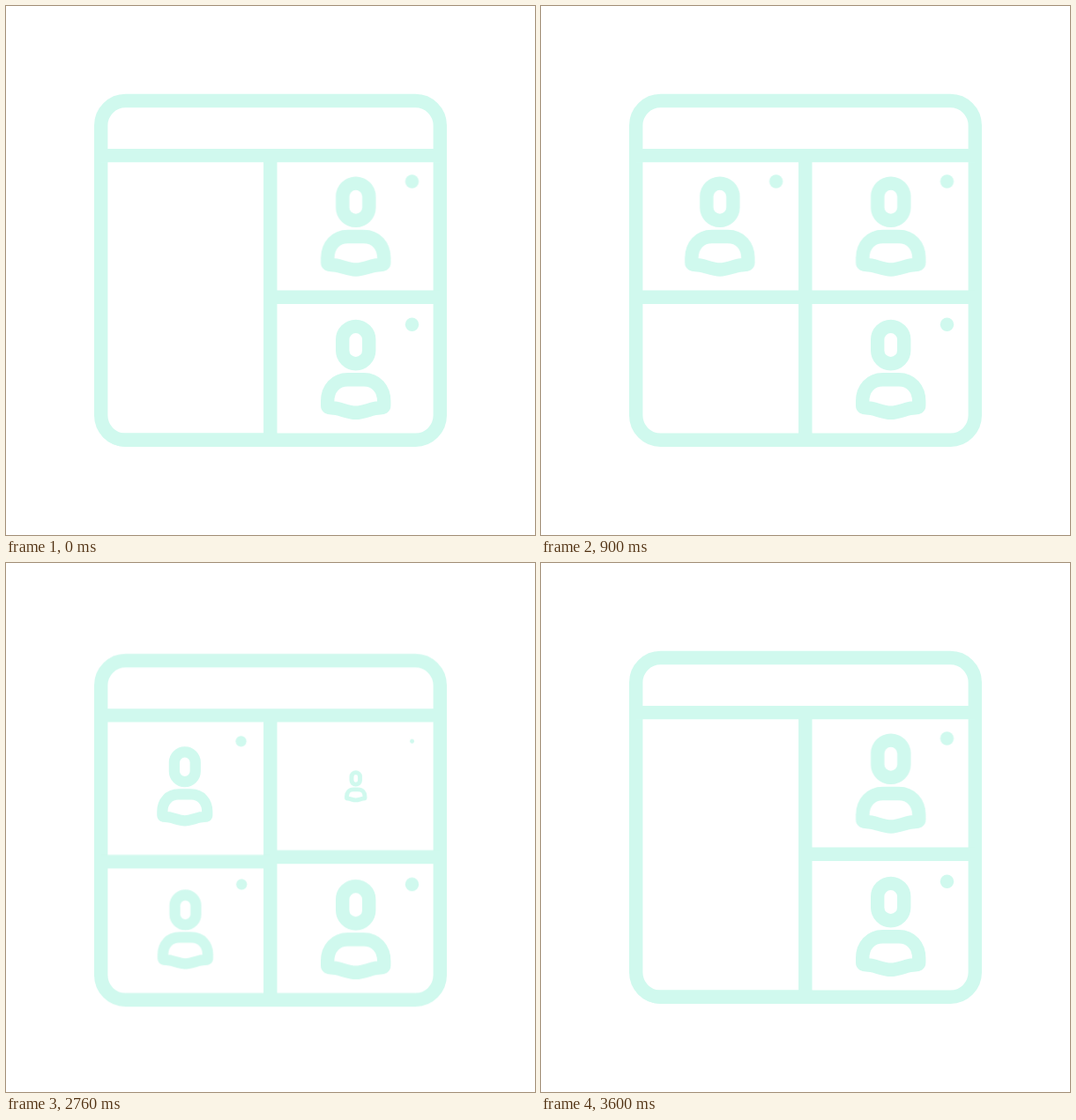
Write an HTML page without scripts that moves like this. It is 600 px wide and 600 px high and loops after 3.63 s.

```html
<!DOCTYPE html>
<html lang="en">
<head>
<meta charset="utf-8">
<title>Video call grid</title>
<style>
  html, body { margin: 0; width: 100%; height: 100%; overflow: hidden; background: #fff; }
  svg { display: block; width: 100%; height: 100%; }

  .line { fill: none; stroke: #d0f9ee; stroke-width: 15.4; stroke-linejoin: round; }
  .dot { fill: #d0f9ee; stroke: none; }

  .window, .divider, .drop, .tl, .tr, .bl { animation: 3.63s linear infinite; }
  .window { animation-name: dip; }
  .divider { animation-name: divide; }
  .drop { animation-name: lift; }
  .tl { animation-name: tl; }
  .tl.dot { animation-name: tl-dot; }
  .tr { animation-name: tr; }
  .bl { animation-name: bl; }

  /* The whole window sinks and recovers at each change of layout. */
  @keyframes dip {
    0% { transform: translateY(0); animation-timing-function: cubic-bezier(.4, 0, .6, 1); }
    8.264% { transform: translateY(17px); animation-timing-function: cubic-bezier(.167, 0, .08, 1); }
    24.8%, 47.107% { transform: translateY(0); animation-timing-function: cubic-bezier(.4, 0, .6, 1); }
    51.24% { transform: translateY(4px); animation-timing-function: cubic-bezier(.167, 0, .2, 1); }
    59.5%, 73.554% { transform: translateY(0); animation-timing-function: cubic-bezier(.4, 0, .6, 1); }
    82% { transform: translateY(17px); animation-timing-function: cubic-bezier(.167, 0, .08, 1); }
    99.17%, 100% { transform: translateY(0); }
  }

  /* Left divider rises from the bottom edge and later falls back. */
  @keyframes divide {
    0% { transform: translateY(162px); animation-timing-function: cubic-bezier(.65, 0, .35, 1); }
    14.6%, 73.554% { transform: translateY(0); animation-timing-function: cubic-bezier(.65, 0, .35, 1); }
    87.466%, 100% { transform: translateY(162px); }
  }

  /* Keeps the first caller centred in its growing cell. */
  @keyframes lift {
    0% { transform: translateY(81px); animation-timing-function: cubic-bezier(.65, 0, .35, 1); }
    14.6%, 100% { transform: translateY(0); }
  }

  @keyframes tl {
    0%, 2.5% { transform: scale(0); animation-timing-function: ease-in-out; }
    9.1% { transform: scale(1.06); animation-timing-function: ease-in-out; }
    14.6%, 73.554% { transform: scale(1); animation-timing-function: ease-in; }
    80%, 100% { transform: scale(0); }
  }
  @keyframes tl-dot {
    0%, 2.5% { transform: scale(0); animation-timing-function: ease-in-out; }
    9.1%, 73.554% { transform: scale(1); animation-timing-function: ease-in; }
    80%, 100% { transform: scale(0); }
  }
  @keyframes tr {
    0%, 47.107% { transform: scale(1); animation-timing-function: ease-in; }
    53%, 74.5% { transform: scale(0); animation-timing-function: ease-out; }
    82%, 100% { transform: scale(1); }
  }
  @keyframes bl {
    0%, 51% { transform: scale(0); animation-timing-function: ease-out; }
    59.3%, 73.554% { transform: scale(1); animation-timing-function: ease-in; }
    80%, 100% { transform: scale(0); }
  }
</style>
</head>
<body>
<svg viewBox="0 0 600 600">
  <defs>
    <g id="person">
      <rect x="-15" y="-48.9" width="30" height="42.3" rx="15"/>
      <path d="M-32 36C-32 22 -23 11.5 -9 11.5H9C23 11.5 32 22 32 36V41Q32 43.5 28 43.5C18 43.5 10 49 0 49S-18 43.5 -28 43.5Q-32 43.5 -32 41Z"/>
    </g>
    <clipPath id="pane"><rect x="100" y="100" width="400" height="400" rx="35.7"/></clipPath>
  </defs>

  <g class="window">
    <g class="line">
      <rect x="107.7" y="107.5" width="384.6" height="384.8" rx="28"/>
      <path d="M108 169.6H492M299.8 169.6V492M299.8 330.3H492"/>
      <g clip-path="url(#pane)"><path class="divider" d="M108 330.3H299.8"/></g>

      <g transform="translate(202.8 250)">
        <g class="drop"><use class="tl" href="#person"/></g>
        <g transform="translate(63.8 -51)"><circle class="tl dot" r="7.7"/></g>
      </g>

      <g transform="translate(396.7 250)">
        <use class="tr" href="#person"/>
        <g transform="translate(63.8 -51)"><circle class="tr dot" r="7.7"/></g>
      </g>

      <g transform="translate(203.4 412.3)">
        <use class="bl" href="#person"/>
        <g transform="translate(63.8 -51)"><circle class="bl dot" r="7.7"/></g>
      </g>

      <g transform="translate(396.7 412.3)">
        <use href="#person"/>
        <circle class="dot" cx="63.8" cy="-51" r="7.7"/>
      </g>
    </g>
  </g>
</svg>
</body>
</html>
```
